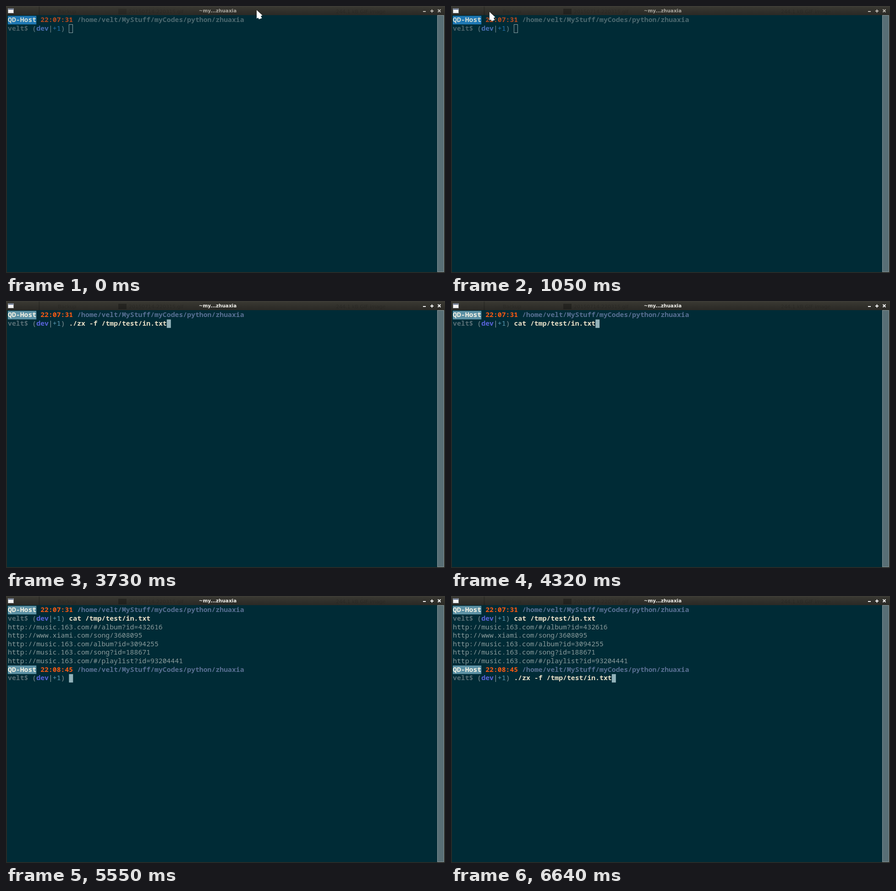
Recreate the animation shown at these times as an HTML page with a canvas. Size 958 px wide and 584 px high, loop 8000 ms.

```html
<!DOCTYPE html>
<html lang="en">
<head>
<meta charset="utf-8">
<title>Terminal</title>
<style>
  html, body { margin: 0; width: 100%; height: 100%; overflow: hidden; background: #002b36; }
  canvas { display: block; width: 958px; height: 584px; }
</style>
</head>
<body>
<canvas id="stage" width="958" height="584"></canvas>
<script>
const ctx = document.getElementById('stage').getContext('2d');
const LOOP = 8000, LEFT = 4, TOP = 21.6, COL = 8.895, ROW = 18.63;
const MONO = '14.825px "Noto Sans Mono", "DejaVu Sans Mono", monospace';
const SANS = '"DejaVu Sans", sans-serif';

const HOST = 'QD-Host', USER = 'velt';
const FOLDER = `/home/${USER}/MyStuff/myCodes/python/zhuaxia`;
const CAT = 'cat /tmp/test/in.txt', RUN = './zx -f /tmp/test/in.txt';
const URLS = [
  'http://music.163.com/#/album?id=432616',
  'http://www.xiami.com/song/3608095',
  'http://music.163.com/album?id=3094255',
  'http://music.163.com/song?id=188671',
  'http://music.163.com/#/playlist?id=93204441'
];

const DIM = {
  title: '#aaa79f', button: '#bfbcb4', hostBg: '#1f78b4', host: '#d5dcd2', time: '#bd4a1c',
  path: '#4c686f', user: '#4c646b', paren: '#6c868c', branch: '#4a70b5', bar: '#7b9095', ahead: '#2574b0'
};
const LIT = {
  title: '#f2f1ec', button: '#ffffff', hostBg: '#5d92a5', host: '#f4f1e4', time: '#fb5a12',
  path: '#586f92', user: '#586e75', paren: '#839496', branch: '#5a63dc', bar: '#93a5a8', ahead: '#5a9bb6'
};

const rowY = r => TOP + r * ROW;
const colX = c => LEFT + c * COL;

function rect(color, x, y, w, h) {
  ctx.fillStyle = color;
  ctx.fillRect(x, y, w, h);
}

function write(text, c, r, color, weight = 600) {
  ctx.font = `${weight} ${MONO}`;
  ctx.textAlign = 'left';
  ctx.fillStyle = color;
  ctx.fillText(text, colX(c), rowY(r) + 13.7);
}

function label(text, x, y, color, font, align = 'left') {
  ctx.font = font;
  ctx.textAlign = align;
  ctx.fillStyle = color;
  ctx.fillText(text, x, y);
}

function titleBar(text, pal, ghostIcon) {
  const g = ctx.createLinearGradient(0, 0, 0, 20);
  g.addColorStop(0, '#403f39');
  g.addColorStop(0.15, '#383731');
  g.addColorStop(1, '#2a2925');
  rect(g, 0, 0, 958, 20);

  // faint window contents showing through
  const ghost = 'rgba(12,12,10,.16)';
  rect(ghost, 71, 1, 3, 19);
  label('Backup', 113, 16, ghost, `11px ${SANS}`);
  rect(ghostIcon ? 'rgba(8,8,7,.32)' : ghost, 245, 6, 18, 12);
  label('20150714-220315.gif', 268, 16, ghost, `11px ${SANS}`);
  label('244.1 kB GIF image', 720, 16, ghost, `11px ${SANS}`);

  rect('#8f9397', 4, 5, 13, 11);
  rect('#5c6c8c', 5, 6, 11, 2);
  rect('#f4f4f4', 5, 8, 11, 7);

  label(text, 462, 14.3, pal.title, `bold 10.4px ${SANS}`, 'center');

  rect(pal.button, 910, 11, 6, 2);
  rect(pal.button, 926, 10, 7, 2);
  rect(pal.button, 928.5, 7.5, 2, 7);
  ctx.strokeStyle = pal.button;
  ctx.lineWidth = 1.8;
  ctx.beginPath();
  ctx.moveTo(942.5, 7.5); ctx.lineTo(948.5, 13.5);
  ctx.moveTo(948.5, 7.5); ctx.lineTo(942.5, 13.5);
  ctx.stroke();
}

function frame() {
  rect('#002b36', 0, 20, 958, 564);
  rect('#292b27', 0, 20, 2, 564);
  rect('#292b27', 956, 20, 2, 564);
  rect('#292b27', 0, 582, 958, 2);
  rect('#8b9b9e', 941, 20, 15, 562);
  rect('#586e75', 942, 21, 13, 560);
}

function prompt(r, time, pal) {
  rect(pal.hostBg, LEFT, rowY(r), 7 * COL, ROW);
  write(HOST, 0, r, pal.host);
  write(time, 8, r, pal.time);
  write(FOLDER, 17, r, pal.path);
  write(USER + '$', 0, r + 1, pal.user);
  write('(', 6, r + 1, pal.paren, 400);
  write('dev', 7, r + 1, pal.branch);
  write('|', 10, r + 1, pal.bar, 400);
  write('+1', 11, r + 1, pal.ahead, 400);
  write(')', 13, r + 1, pal.paren, 400);
}

function caret(c, r, filled) {
  const x = colX(c), y = rowY(r) + 0.2;
  if (filled) return rect('#92b2ba', x, y, COL, 18.4);
  ctx.strokeStyle = '#8fa4a8';
  ctx.lineWidth = 1;
  ctx.strokeRect(Math.round(x) + 0.5, Math.round(y) + 0.5, 8, 18);
}

function command(text, r, showCaret = true) {
  write(text, 15, r, '#e8e0c8');
  if (showCaret) caret(15 + text.length, r, true);
}

function pointer(t) {
  if (t >= 1590) return;
  let x = 547, y = 9;
  if (t >= 150) {
    const k = Math.min(1, (Math.floor((t - 150) / 40) + 1) / 10);
    const e = k * k * (3 - 2 * k);
    x -= 463 * e;
    y += 4 * e;
  }
  if (t >= 1420) {
    const k = Math.min(3, Math.floor((t - 1420) / 40) + 1) / 3;
    x -= 55 * k;
    y += 3 * k;
  }
  ctx.save();
  ctx.translate(Math.round(x), Math.round(y));
  ctx.fillStyle = '#fff';
  ctx.beginPath();
  for (const [px, py] of [[0, 0], [12.5, 11.5], [9, 13], [11.5, 17.5], [5, 20], [3, 16.5], [0, 18.5]]) ctx.lineTo(px, py);
  ctx.fill();
  ctx.restore();
}

function draw(t) {
  const focused = t >= 1090, pal = focused ? LIT : DIM;
  const title = t >= 5470 && t < 5550 ? 'cat' : '~my...zhuaxia';
  frame();
  titleBar(title, pal, t >= 970);
  prompt(0, '22:07:31', pal);

  if (t < 3730) caret(15, 1, focused);
  else if (t < 4320) command(RUN, 1);
  else command(CAT, 1, t < 5510);

  if (t >= 5510) URLS.forEach((url, i) => write(url, 0, i + 2, '#8a9b9c', 400));
  if (t >= 5550) {
    prompt(7, '22:08:45', pal);
    command(t < 6490 ? '' : t < 6640 ? CAT : RUN, 8);
  }
  pointer(t);
}

const start = performance.now();
function tick() {
  draw((performance.now() - start) % LOOP);
  requestAnimationFrame(tick);
}
tick();
</script>
</body>
</html>
```
